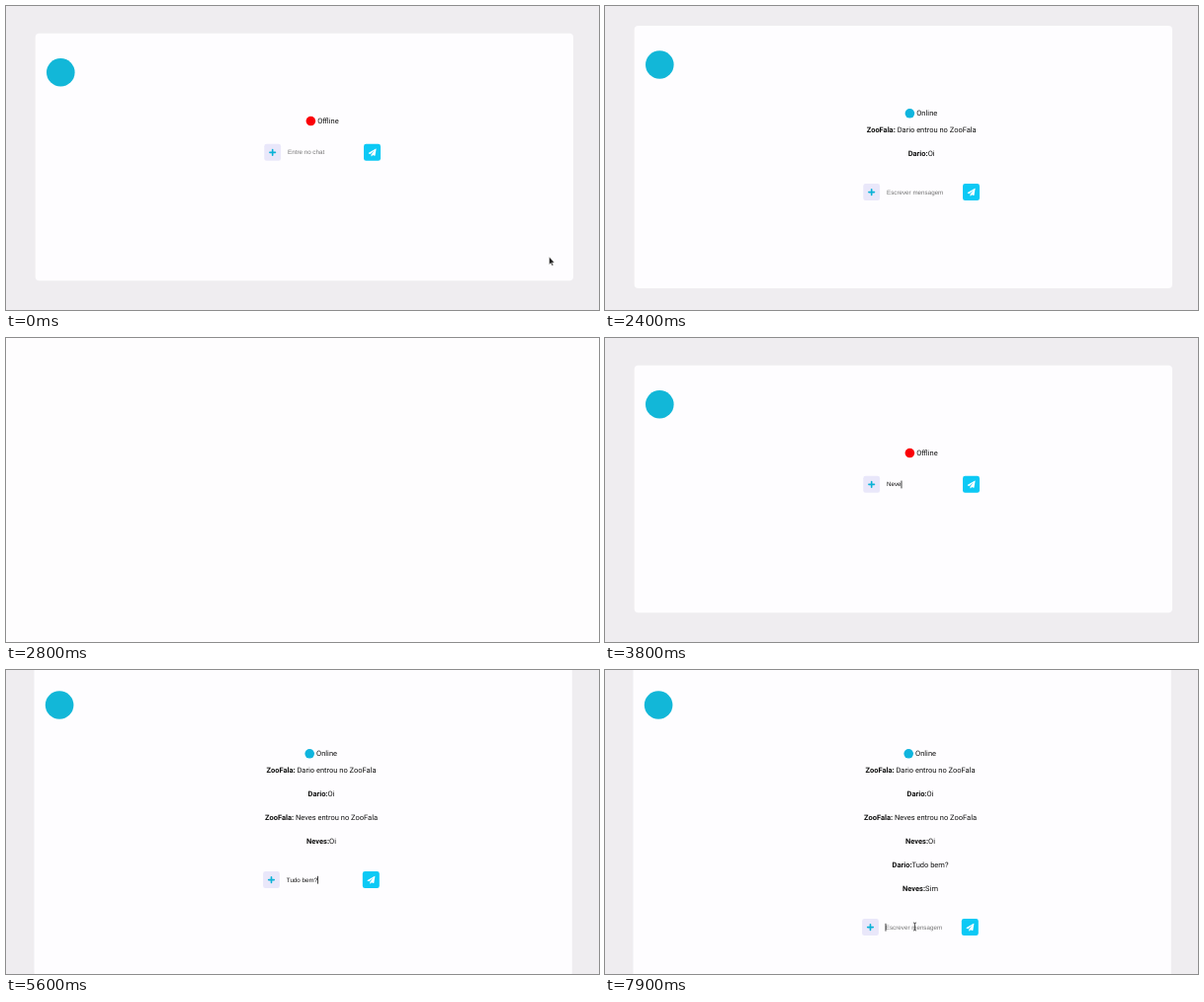
Recreate the animation shown at these times as an HTML page. Size 600 by 308 pixels, loop 8 s.

```html
<!DOCTYPE html>
<html lang="pt">
<head>
<meta charset="utf-8">
<title>Chat</title>
<style>
  html, body { margin: 0; width: 100%; height: 100%; overflow: hidden; background: #efedf0; }
  svg { display: block; width: 600px; height: 308px; }
  text { font: 7.5px Roboto, sans-serif; fill: #111; text-rendering: geometricPrecision; }
  .name { font-weight: 700; }
  .field { font: 6.25px "Liberation Sans", Arial, sans-serif; }
</style>
</head>
<body>
<svg viewBox="0 0 600 308">
  <rect width="600" height="308" fill="#efedf0"/>
  <g id="page">
    <rect id="card" x="29.7" width="544.3" rx="4" fill="#fefdff"/>
    <circle cx="55.3" cy="39.5" r="14.3" fill="#12b7d8"/>
    <circle id="dot" cx="308.4" cy="88.8" r="4.8"/>
    <text id="status" x="315.2" y="91.4"></text>
    <g id="rows"></g>
    <g id="form">
      <rect x="261.3" y="-8.5" width="16.8" height="17" rx="2.4" fill="#e9e7fa"/>
      <path d="M269.7-2.8V2.8M266.9 0H272.5" stroke="#0bb2d6" stroke-width="1.6" stroke-linecap="round"/>
      <text id="field" class="field" x="285" y="2.1"></text>
      <rect id="caret" y="-3.8" width=".8" height="7.8" fill="#111"/>
      <rect x="362" y="-8.5" width="17" height="17" rx="2.4" fill="#0cc9f5"/>
      <path transform="translate(366.6 -4) scale(.5)" fill="#fff"
        d="M15.3.2.7 8.7q-1 .8 0 1.5L4 11.5 12.6 4 5.8 12.3V15.3q.3 1 1.2.4L9 13.2 12.7 14.7q.9.2 1.1-.6L16 .9q0-1-.7-.7z"/>
    </g>
  </g>
  <rect id="cover" width="600" height="308"/>
  <g id="pointer">
    <path d="M0 0V8L1.8 6.5 3 9.2 4.3 8.6 3.1 6H5.5Z" fill="#222" stroke="#fff" stroke-width=".5"/>
    <path d="M-1.5-4Q0-4 0-3Q0-4 1.5-4M0-3V3M-1.5 4Q0 4 0 3Q0 4 1.5 4" fill="none" stroke="#333" stroke-width=".8"/>
    <path d="M-.8 0Q0-1 .8 0V3L4 3.8Q5 4 4.6 6L4 9H0L-2.4 5.4Q-2.6 4-.8 5Z" fill="#fff" stroke="#222" stroke-width=".6"/>
  </g>
</svg>
<script>
const $ = id => document.getElementById(id);
const show = (el, on) => { el.style.display = on ? '' : 'none'; };

const APP = 'ZooFala', ANA = 'Dario', BIA = 'Neves';
const joined = who => [APP, ` ${who} entrou no ${APP}`];
const messages = [joined(ANA), [ANA, 'Oi'], joined(BIA), [BIA, 'Oi'], [ANA, 'Tudo bem?'], [BIA, 'Sim']];

// time, first message, end of messages, online, cover colour
const scenes = [
  [0, 0, 0, 0], [1300, 0, 0, 1], [1400, 0, 1, 1], [2100, 0, 2, 1],
  [2600, 0, 2, 1, '#272527'], [2800, 0, 2, 1, '#fefdfe'],
  [3000, 2, 2, 0], [4100, 2, 2, 1], [4200, 2, 3, 1], [4600, 2, 4, 1],
  [4900, 0, 4, 1], [5800, 0, 5, 1], [6400, 2, 5, 1], [7000, 2, 6, 1], [7300, 0, 6, 1]
];

// focus, first key, sent, ms per key, text
const typing = [
  [500, 600, 1300, 100, ANA], [1500, 1700, 2100, 100, 'Oi'],
  [3400, 3500, 4100, 100, BIA], [4200, 4300, 4600, 100, 'Oi'],
  [5000, 5100, 5800, 60, 'Tudo bem?'], [6600, 6700, 7000, 100, 'Sim'],
  [7900, 8000, 8000, 100, '']
];

// time, x, y, shape
const HIDDEN = 0, ARROW = 1, BEAM = 2, HAND = 3;
const moves = [
  [0, 549.5, 254, ARROW], [300, 313, 149, BEAM], [600, 0, 0, HIDDEN],
  [1100, 340, 149, ARROW], [1200, 370, 149, HAND], [1400, 335, 153, ARROW],
  [1500, 313, 172, BEAM], [1700, 0, 0, HIDDEN], [1900, 330, 172, ARROW],
  [2000, 370, 172, HAND], [2200, 372, 150, ARROW], [2400, 400, -12, HIDDEN],
  [3000, 380, 10, ARROW], [3200, 313, 149, BEAM], [3500, 0, 0, HIDDEN],
  [4900, 400, 20, ARROW], [5000, 313, 213, BEAM], [5100, 0, 0, HIDDEN],
  [5900, 340, 213, ARROW], [6100, 416, 12, ARROW], [6200, 0, 0, HIDDEN],
  [6500, 400, 10, ARROW], [6600, 313, 200, BEAM], [6700, 0, 0, HIDDEN],
  [7100, 340, 150, ARROW], [7200, 400, 4, ARROW], [7300, 380, 24, ARROW],
  [7700, 313.5, 260, BEAM]
];

const rows = messages.map(([name, body]) => {
  const row = document.createElementNS('http://www.w3.org/2000/svg', 'text');
  row.setAttribute('x', 320.2);
  row.setAttribute('text-anchor', 'middle');
  row.innerHTML = `<tspan class="name">${name}:</tspan>${body}`;
  return $('rows').appendChild(row);
});

const lastIndex = (list, t) => list.findLastIndex(item => item[0] <= t);

function drawPage(t) {
  const [, first, end, online, cover] = scenes[lastIndex(scenes, t)];
  const count = end - first;
  const height = Math.max(250.5, 218 + 24 * count);
  const top = Math.max(-4, (306 - height) / 2);
  $('page').setAttribute('transform', `translate(${count > 3 ? -1.2 : 0} ${top})`);
  $('card').setAttribute('height', height);
  $('dot').setAttribute('fill', online ? '#0fb5de' : '#fb0007');
  $('status').textContent = online ? 'Online' : 'Offline';
  rows.forEach((row, i) => {
    show(row, i >= first && i < end);
    row.setAttribute('y', 108.1 + 24 * (i - first));
  });
  $('form').setAttribute('transform', `translate(0 ${120.6 + 24 * count})`);
  show($('cover'), cover);
  if (cover) $('cover').setAttribute('fill', cover);
  return online;
}

function drawField(t, online) {
  const entry = typing.find(([focus, , sent]) => t >= focus && t < sent);
  let value = '';
  if (entry) {
    const [, start, , pace, text] = entry;
    value = text.slice(0, Math.max(0, Math.floor((t - start) / pace) + 1));
  }
  const field = $('field');
  field.textContent = value || (online ? 'Escrever mensagem' : 'Entre no chat');
  field.style.fill = value ? '#111' : '#757575';
  show($('caret'), entry);
  $('caret').setAttribute('x', value ? 285 + field.getComputedTextLength() : 284.8);
}

function drawPointer(t) {
  const i = lastIndex(moves, t);
  const [t0, x0, y0, shape] = moves[i];
  const next = moves[i + 1];
  let x = x0, y = y0;
  const moving = next && next[3] && (shape === ARROW || next[0] - t0 <= 100);
  if (moving) {
    const k = (t - t0) / (next[0] - t0);
    x += (next[1] - x0) * k;
    y += (next[2] - y0) * k;
  }
  $('pointer').setAttribute('transform', `translate(${x} ${y})`);
  [...$('pointer').children].forEach((el, n) => show(el, n + 1 === shape));
}

function draw(now) {
  const t = Math.floor(now % 8000 / 100) * 100;
  drawField(t, drawPage(t));
  drawPointer(t);
}

function loop(now) {
  draw(now);
  requestAnimationFrame(loop);
}
draw(0);
requestAnimationFrame(loop);
</script>
</body>
</html>
```
